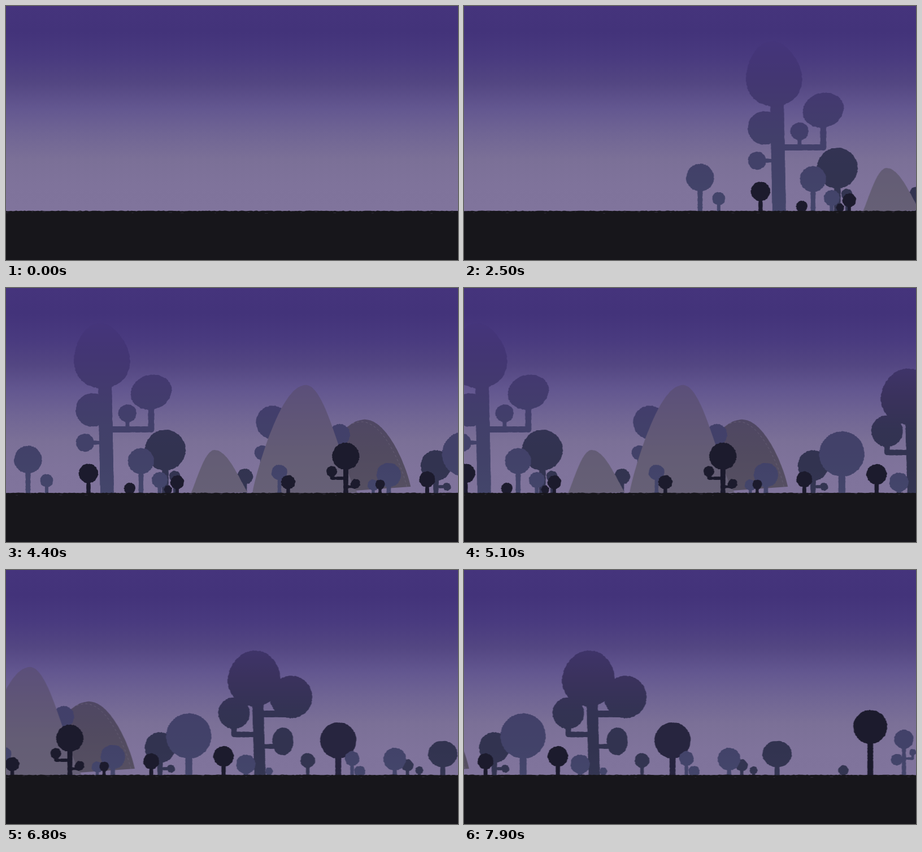
Animation of 800x450 px, one loop 8 s. Source, as an HTML page with a canvas:

```html
<!DOCTYPE html>
<html>
<head>
<meta charset="utf-8">
<style>
  html, body { margin: 0; width: 100%; height: 100%; overflow: hidden; background: #17161b; }
  canvas { display: block; }
</style>
</head>
<body>
<canvas id="stage" width="800" height="450"></canvas>
<script>
const W = 800, H = 450, GROUND = 363, LOOP = 8000, STEP = 8.42;
const view = document.getElementById('stage').getContext('2d');
const world = document.createElement('canvas');
world.width = 2440;
world.height = H;
const g = world.getContext('2d');

let seed = 7;
const rnd = () => (seed = seed * 16807 % 2147483647) / 2147483647;
const jit = a => (rnd() * 2 - 1) * a;

// Evenly spaced colours from height y down to the ground
function fade(y, ...colours) {
  const paint = g.createLinearGradient(0, y, 0, GROUND);
  colours.forEach((c, i) => paint.addColorStop(i / (colours.length - 1), c));
  return paint;
}

const sky = fade(0, '#45347c', '#43337a', '#493a7f', '#534682', '#635790', '#706594', '#7b7097', '#7f739b', '#80749c');
const light = fade(63, '#45357b', '#433673', '#433b6e', '#42406a', '#424269', '#44466b');
const dark = fade(142, '#3f3469', '#3a325c', '#333353', '#323350', '#343652');
const pale = fade(171, '#5b4f7a', '#605677', '#645d75', '#666076');
const brown = fade(232, '#4f4763', '#524b60', '#565062');
const dusk = '#27253f', black = '#1c1b2d';

function fillPoly(points) {
  g.beginPath();
  for (const [x, y] of points) g.lineTo(x, y);
  g.fill();
}

// Rough-edged disc; taper narrows the top
function blob(x, y, r, { fat = 1, tilt = 0, taper = 0 } = {}) {
  const n = Math.ceil(r * 3), c = Math.cos(tilt), s = Math.sin(tilt), points = [];
  for (let i = 0; i < n; i++) {
    const a = i / n * Math.PI * 2, k = r + jit(0.7);
    const u = k * fat * Math.cos(a) * (1 + taper * Math.sin(a)), v = k / fat * Math.sin(a);
    points.push([x + u * c - v * s, y + u * s + v * c]);
  }
  fillPoly(points);
}

// Rough-edged straight stroke
function limb(w, x1, y1, x2, y2) {
  const n = Math.ceil(Math.hypot(x2 - x1, y2 - y1));
  for (let i = 0; i <= n; i++) {
    g.beginPath();
    g.arc(x1 + (x2 - x1) * i / n, y1 + (y2 - y1) * i / n, w / 2 - 0.3 + jit(0.5), 0, 7);
    g.fill();
  }
}

const girth = r => 3.5 + 0.22 * r;

function tree(paint, x, y, r, form) {
  g.fillStyle = paint;
  limb(girth(r), x, y, x, GROUND + 3);
  blob(x, y, r, form);
}

// Crown on an elbow that leaves the trunk `drop` below the crown's centre
function arm(trunk, x, y, r, drop = 0, form) {
  limb(girth(r), trunk, y + drop, x, y + drop);
  limb(girth(r), x, y + drop, x, y);
  blob(x, y, r, form);
}

// Each slope is a quarter cosine; `bulge` below 1 rounds it, above 1 hollows it
function slope(x, height, left, right, bulgeL, bulgeR) {
  const points = [];
  for (let u = -1; u <= 1; u += 0.02) {
    const rise = Math.cos(u * Math.PI / 2) ** (u < 0 ? bulgeL : bulgeR);
    points.push([x + u * (u < 0 ? left : right), GROUND + 1 - height * rise]);
  }
  return points;
}

function hill(paint, ...form) {
  g.fillStyle = paint;
  fillPoly(slope(...form).map(([x, y]) => [x, y + jit(0.3)]));
}

function tallTree(x) {
  g.fillStyle = light;
  limb(24, x - 2, 165, x + 2, GROUND + 3);
  arm(x, x - 24, 216, 29.5);
  arm(x, x - 37, 274, 16);
  arm(x, x + 38, 222, 16, 29);
  arm(x, x + 80, 184.5, 33.5, 66, { fat: 1.1, tilt: -0.3 });
  blob(x - 8, 120, 53, { fat: 0.92, tilt: -0.1, taper: 0.18 });
}

function wideTree(x) {
  g.fillStyle = dark;
  limb(20, x - 2, 230, x + 2, GROUND + 3);
  arm(x, x - 44, 253.5, 28, 38);
  arm(x, x + 57, 225, 37.5, 30);
  arm(x, x + 42.5, 303.5, 21.5, 9, { fat: 0.87 });
  blob(x - 8, 192, 48, { fat: 0.97, tilt: 0.1, taper: 0.07 });
}

function branchedTree(x) {
  tree(black, x, 298, 24);
  arm(x, x - 25, 325, 9.5, 12);
  arm(x, x + 17, 347, 8.5, 5);
}

function hills() {
  const far = [1519, 131, 90, 83, 0.7, 0.7];
  hill(brown, ...far);
  g.strokeStyle = '#6b647a';
  g.lineWidth = 0.8;
  g.setLineDash([4, 4]);
  g.beginPath();
  for (const [x, y] of slope(...far)) g.lineTo(x - 6, y + 4);
  g.stroke();

  tree(light, 1474.5, 259.5, 18.5);
  tree(light, 1356, 238, 29.5);
  tree(light, 1337, 292, 13);
  tree(dark, 1307, 334, 14);
  hill(pale, 1415, 192, 95, 93, 0.85, 1.4);
  hill(pale, 1253, 77, 42, 60, 1.1, 1.1);
}

function ground() {
  const points = [[world.width, H], [0, H]];
  for (let x = 0; x <= world.width; x += 3) points.push([x, GROUND + jit(0.5)]);
  g.fillStyle = '#17161b';
  fillPoly(points);
  g.fillStyle = '#35313f';
  for (let x = 0; x < world.width; x += 18 + rnd() * 50) g.fillRect(x, 364 + rnd() * 3, 2 + rnd() * 4, 0.8);
}

function paintWorld() {
  tree(light, 923, 304, 24.5);
  tree(light, 956, 341, 11.5);
  tallTree(1061);
  tree(black, 1030, 328.5, 17);
  tree(black, 1103, 355, 10);
  tree(dark, 1166, 287, 36);
  tree(light, 1123, 306.5, 23);
  tree(dark, 1183, 334, 10);
  tree(light, 1156, 340, 14);
  tree(black, 1171, 357, 7);
  tree(black, 1187, 344, 12);

  hills();
  tree(light, 1368, 327, 14);
  tree(black, 1383.5, 344, 12.5);
  tree(light, 1534, 349, 10);
  tree(light, 1561.5, 331, 21.5);
  tree(black, 1546, 348, 8.5);
  branchedTree(1485.5);

  tree(dark, 1645, 314.5, 27);
  arm(1645, 1664.5, 352, 7);
  tree(black, 1629.5, 339, 14);
  tree(light, 1696, 294, 40);
  tree(black, 1757.5, 330, 18);
  wideTree(1820);
  tree(light, 1797, 344, 17);
  tree(light, 1838, 357, 7);
  tree(dark, 1906.5, 337.5, 13);

  tree(dusk, 1960.5, 302, 32);
  tree(light, 1985, 334, 13);
  tree(light, 1998.5, 357, 10);
  tree(dark, 2083, 346, 10.5);
  tree(light, 2060.5, 335, 20);
  tree(dark, 2104, 355, 7);
  tree(dark, 2145.5, 326, 24.5, { fat: 1.06 });
  tree(dark, 2263, 355, 9);
  tree(black, 2310.5, 278, 30);
  tree(light, 2370, 300, 17);
  arm(2370, 2357.5, 336, 10.5);
  arm(2370, 2385.5, 323, 6, 11);

  ground();
}

// The scene advances at 24 poses a second and is shown ten times a second
function draw() {
  const tick = Math.floor(performance.now() % LOOP / 100);
  const pose = Math.floor(tick * 24 / 10);
  view.fillStyle = sky;
  view.fillRect(0, 0, W, H);
  view.drawImage(world, -pose * STEP, 0);
  requestAnimationFrame(draw);
}

paintWorld();
draw();
</script>
</body>
</html>
```
